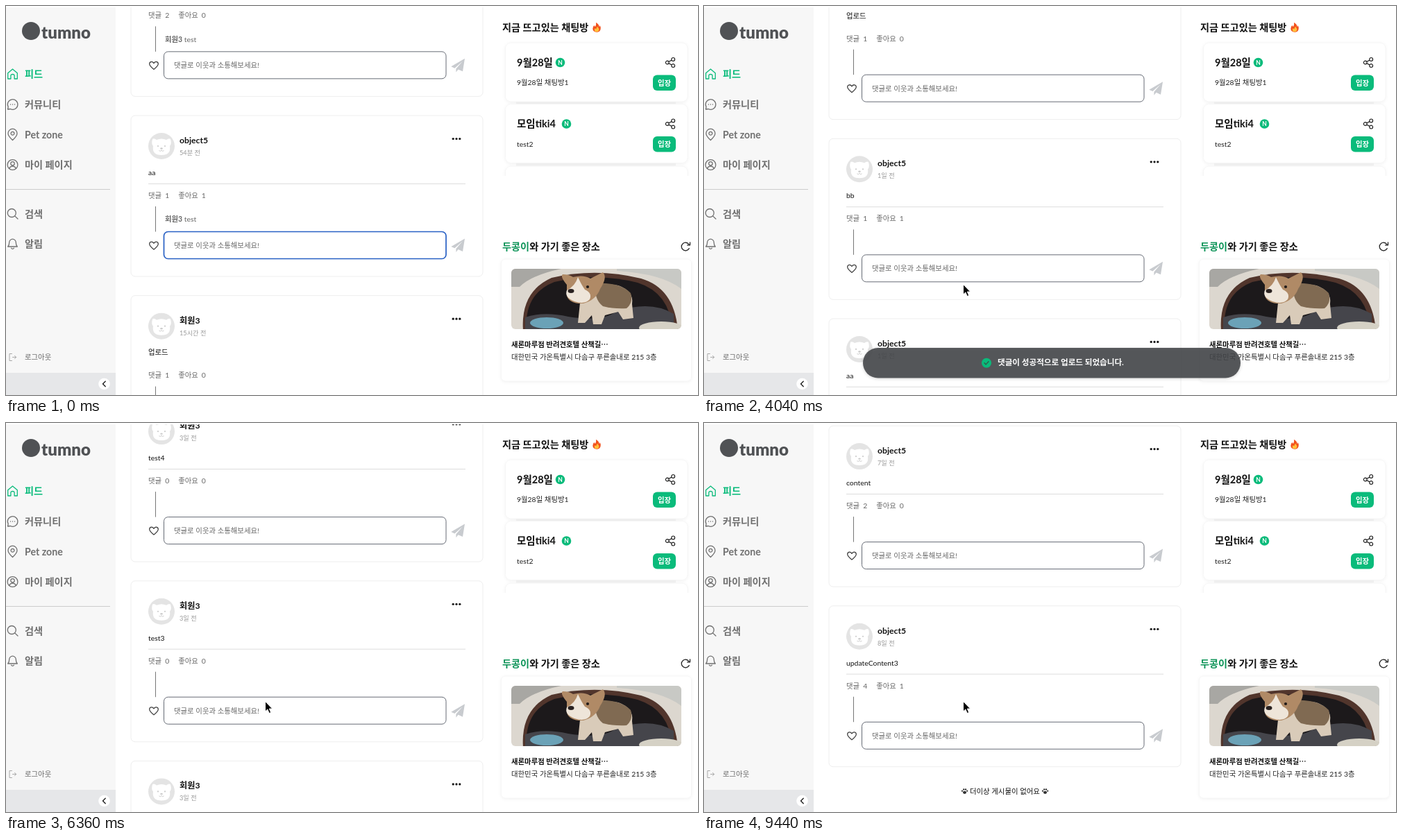
Recreate the animation shown at these times as an HTML page. Size 997 by 561 pixels, loop 9840 ms.

```html
<!DOCTYPE html>
<html lang="ko">
<head>
<meta charset="utf-8">
<style>
html, body { margin: 0; width: 100%; height: 100%; overflow: hidden; background: #fff; }
svg { display: block; font-family: Lato, "Noto Sans CJK KR", "Noto Sans CJK", sans-serif; }
.panel { fill: #fff; stroke: #f6f6f6; filter: drop-shadow(0 1px 2px #0000000d); }
</style>
</head>
<body>
<svg id="stage" width="997" height="561" viewBox="0 0 997 561"></svg>
<script>
const LOOP = 9840, STEP = 40, PITCH = 259.65, GREEN = '#0abb7b';
const stage = document.getElementById('stage');

// y is the vertical middle of the line
const text = (x, y, size, str, fill = '#111', weight = 400, extra = '') =>
  `<text x="${x}" y="${y + size * 0.37}" font-size="${size}" fill="${fill}" font-weight="${weight}" ${extra}>${str}</text>`;
const rect = (x, y, w, h, r, attrs) => `<rect x="${x}" y="${y}" width="${w}" height="${h}" rx="${r}" ${attrs}/>`;
const circle = (x, y, r, fill) => `<circle cx="${x}" cy="${y}" r="${r}" fill="${fill}"/>`;
const oval = (x, y, rx, ry, fill) => `<ellipse cx="${x}" cy="${y}" rx="${rx}" ry="${ry}" fill="${fill}"/>`;
const path = (d, attrs) => `<path d="${d}" ${attrs}/>`;
const at = (x, y, body, scale = 1) => `<g transform="translate(${x} ${y}) scale(${scale})">${body}</g>`;
// line icons are drawn around 0,0 in a box of about 16
const icon = (x, y, d, color, width = 1.3) =>
  at(x, y, path(d, `fill="none" stroke="${color}" stroke-width="${width}" stroke-linecap="round" stroke-linejoin="round"`));
const ring = (x, y, r) => `M${x - r} ${y}a${r} ${r} 0 1 0 ${2 * r} 0a${r} ${r} 0 1 0 ${-2 * r} 0`;

const USER = '회원3', OTHER = 'object5';
const HEART = 'M0 5.5C-3 3-6.3 .7-6.3-2.3C-6.3-5.8-2-6.6 0-3.3C2-6.6 6.3-5.8 6.3-2.3C6.3 .7 3 3 0 5.5Z';
const PLANE = 'M10-10L7 8.5L.5 5.6L-2.6 9.6V4.6L6.8-6.2L-4.6 3.8L-9.7 1.5Z';

// name, time, body, comments, likes, options
const posts = [
  [USER, '50분 전', 'test', 2, 0, { reply: 1 }],
  [OTHER, '54분 전', 'aa', 1, 1, { reply: 1 }],
  [USER, '15시간 전', '업로드', 1, 0, { plain: 1 }],
  [OTHER, '1일 전', 'bb', 1, 1, {}],
  [OTHER, '1일 전', 'aa', 0, 0, {}],
  [OTHER, '1일 전', '{ "content": "aa" }', 0, 0, {}],
  [USER, '3일 전', 'test4', 0, 0, {}],
  [USER, '3일 전', 'test3', 0, 0, {}],
  [USER, '3일 전', 'test', 0, 0, {}],
  [USER, '4일 전', 'test2', 0, 0, {}],
  [USER, '4일 전', 'test', 0, 0, {}],
  [USER, '4일 전', 'test', 0, 0, {}],
  [OTHER, '7일 전', '강아지', 2, 1, { plain: 1, liked: 1 }],
  [USER, '7일 전', 'ㅎㅇ', 3, 1, { liked: 1 }],
  [OTHER, '7일 전', 'content', 2, 0, {}],
  [OTHER, '8일 전', 'updateContent3', 4, 1, {}],
];

const avatar = circle(0, 0, 19, '#e4e4e4') +
  path('M-13-10Q-11-12-7-9Q0-12 7-9Q11-12 13-10Q15-3 12 0Q14 13 0 13Q-14 13-12 0Q-15-3-13-10Z', 'fill="#fff"') +
  circle(-5, 0, 1.1, '#ccc') + circle(5, 0, 1.1, '#ccc') + oval(0, 3.5, 1.8, 1.2, '#ccc') +
  path('M-3.5 6.5Q-1.5 8.5 0 6Q1.5 8.5 3.5 6.5', 'fill="none" stroke="#ccc"');

function post([name, when, body, comments, likes, opt], i) {
  return at(0, i * PITCH,
    rect(180, 0, 507, 232, 6, 'fill="#fff" stroke="#eee"') +
    at(224, 44, avatar) +
    text(250, 35.5, 12.2, name, '#111', 700) +
    text(250, 53.7, 9.2, when, '#999') +
    [-4.8, 0, 4.8].map(dx => circle(649 + dx, 33.5, 1.6, '#111')).join('') +
    text(205, 82, 10.4, body) +
    (opt.plain ? '' : path('M205 98.4H662', 'stroke="#ddd"')) +
    text(205, 115, 10.4, `댓글<tspan dx="5">${comments}</tspan><tspan dx="13">좋아요</tspan><tspan dx="5">${likes}</tspan>`, '#666') +
    path('M215.5 131V167.5', 'stroke="#777"') +
    (opt.reply ? text(229, 149.5, 10.4, `<tspan font-weight="700">${USER}</tspan> test`, '#666') : '') +
    icon(213, 187.5, HEART, opt.liked ? '#e0242f' : '#444') +
    rect(227.5, 167.5, 406.5, 39, 6, `fill="#fff" stroke="#666b75" ${i === 1 ? 'id="field"' : ''}`) +
    text(242, 187, 10.4, '댓글로 이웃과 소통해보세요!', '#666') +
    at(651, 187.5, path(PLANE, 'fill="#c8cbcf"')));
}

const paw = oval(0, 1.8, 2.6, 2.1, '#333') + circle(-3.6, -.3, 1.1, '#333') +
  circle(-1.3, -2.6, 1.2, '#333') + circle(1.5, -2.6, 1.2, '#333') + circle(3.7, -.3, 1.1, '#333');
const feedEnd = at(0, 16 * PITCH + 7.6,
  at(375.5, 0, paw) + text(383, 0, 10.4, '더이상 게시물이 없어요', '#111', 500) + at(491.5, 0, paw));

const menu = [
  [98, '피드', 'M-6.8-1.2L0-7L6.8-1.2V7H2.6V2.5Q2.6 .5 0 .5Q-2.6 .5-2.6 2.5V7H-6.8Z', GREEN],
  [142, '커뮤니티', 'M-7 7L-6.3 3.5A7.3 7.3 0 1 1-3.2 6.5ZM-3 0h.1M0 0h.1M3 0h.1'],
  [185.5, 'Pet zone', 'M0 8Q-6.5 2-6.5-1.8A6.5 6.5 0 0 1 6.5-1.8Q6.5 2 0 8Z' + ring(0, -1.8, 2.4)],
  [229, '마이 페이지', ring(0, 0, 7.4) + ring(0, -1.7, 2.7) + 'M-5 5.3Q-3.5 2.2 0 2.2Q3.5 2.2 5 5.3'],
  [299.5, '검색', ring(-1.2, -1, 6) + 'M3.2 3.4L7.5 7.5'],
  [343, '알림', 'M-6.8 4Q-4.8 2-4.8-2A4.8 4.8 0 0 1 4.8-2Q4.8 2 6.8 4ZM-2 6.2Q0 8.6 2 6.2'],
];
const sidebar = rect(0, 2, 158, 559, 0, 'fill="#f7f7f7"') +
  circle(36, 36, 13, '#505255') + text(51, 38, 24, 'tumno', '#505255', 900) +
  menu.map(([y, label, d, color = '#707070']) =>
    icon(9.5, y, d, color) + text(27, y, 14.2, label, color, 700)).join('') +
  path('M0 264.5H150', 'stroke="#ccc"') +
  icon(9.5, 506.5, 'M-1-5H-4.5V5H-1M0 0H5M3-2.2L5.2 0L3 2.2', '#aaa', 1) +
  text(27, 506.5, 10.4, '로그아웃', '#666') +
  rect(0, 529, 158, 32, 0, 'fill="#e6e7e9"') +
  circle(141.5, 545, 8.3, '#fff') + icon(141.5, 545, 'M1.7-3.8L-2 0L1.7 3.8', '#222', 1.4);

const SHARE = ring(-4.2, 0, 2.4) + ring(4.2, -4.6, 2.4) + ring(4.2, 4.6, 2.4) + 'M-2-1.2L2-3.4M-2 1.2L2 3.4';
const chat = (y, title, badgeX, note) => at(0, y,
  rect(719.5, 0, 262.5, 85, 8, 'class="panel"') +
  path('M735 87H965', 'stroke="#f0f0f0" stroke-width="4"') +
  (title ? text(736, 28.5, 14.5, title, '#111', 700) +
    circle(badgeX, 28.5, 6.8, GREEN) + text(badgeX, 28.6, 8.5, 'N', '#fff', 700, 'text-anchor="middle"') +
    icon(957, 28.5, SHARE, '#222', 1.2) +
    text(736, 57.5, 10.4, note, '#222') +
    rect(932, 46.5, 33, 22.5, 6, `fill="${GREEN}"`) +
    text(948.5, 57.7, 10.4, '입장', '#fff', 700, 'text-anchor="middle"') : ''));

const flame = path('M-1-8Q4-5 4-1Q5.5-2 5.3-3.5Q7 0 6.2 3Q5 7.5 0 7.5Q-6 7.3-6.3 2Q-6.3-1-3.8-3.5Q-3.5-1.8-2.4-1Q-.3-4-1-8Z', 'fill="#f2511d"') +
  path('M.5-2Q4 1 3.8 3.7Q3.2 7-.2 7Q-3.6 6.7-3.6 3.5Q-3.4 2-2.4 1.2Q-2 2.4-1 2.4Q.8 .8 .5-2Z', 'fill="#ffc03b"');

const photo = '<clipPath id="photo">' + rect(728, 379, 245, 87, 6, '') + '</clipPath><g clip-path="url(#photo)">' +
  rect(728, 379, 245, 87, 0, 'fill="#dcd7cf"') +
  path('M728 379H800Q757 388 740 405H728Z', 'fill="#a8a7a3"') +
  path('M880 379H973V408Q945 386 880 382Z', 'fill="#c8c9c5"') +
  path('M745 468Q741 412 786 392Q850 377 915 393Q963 407 968 468Z', 'fill="#51352c"') +
  path('M750 468Q746 415 790 398Q850 384 910 399Q957 414 960 468Z', 'fill="#1c191b"') +
  path('M748 449Q775 440 810 448Q860 456 880 440Q930 424 962 444V468H748Z', 'fill="#45454b"') +
  oval(779, 457, 24, 8, '#6ba2b7') +
  path('M836 408Q852 397 882 403Q905 411 902 430L904 450L889 452L882 441L863 446L858 459H846L844 446L834 457H824L827 428Z', 'fill="#d9cbb9"') +
  path('M850 400Q884 398 900 414Q904 428 894 436Q876 437 860 433Q846 422 850 400Z', 'fill="#806a52"') +
  path('M808 402Q798 390 802 387Q811 387 817 391Q832 387 842 393L860 384Q867 391 856 408Q850 424 832 429Q812 430 808 418Z', 'fill="#b08a66"') +
  path('M824 391Q829 402 834 409Q845 414 841 423Q834 431 819 426Q804 420 808 410Q820 404 824 391Z', 'fill="#eee5d9"') +
  oval(814, 411, 4.5, 3, '#29211f') + circle(838, 405, 2.1, '#211b19') +
  oval(944, 464, 32, 9, '#d5d1c5') + '</g>';

const aside = text(715, 31, 14.2, '지금 뜨고있는 채팅방', '#111', 700) + at(851, 31, flame, .9) +
  '<clipPath id="chats"><rect x="712" y="45" width="285" height="200"/></clipPath><g clip-path="url(#chats)">' +
  chat(53, '9월28일', 798.5, '9월28일 채팅방1') + chat(141.5, '모임tiki4', 807.5, 'test2') + chat(231, '') + '</g>' +
  text(715, 347, 14.2, '<tspan fill="#0d9458">두콩이</tspan>와 가기 좋은 장소', '#111', 700) +
  icon(979, 347, 'M5.2 2.6A5.8 5.8 0 1 1 5-3M6.5-6V-2.2H2.6', '#222') +
  rect(713.5, 365, 274, 176, 6, 'class="panel"') + photo +
  text(728, 488, 10.4, '새론마루점 반려견호텔 산책길⋯', '#111', 700) +
  text(728, 506.5, 10.4, '대한민국 가온특별시 다솜구 푸른솔내로 215 3층', '#222');

const toast = '<g id="toast">' +
  rect(229, 493, 544, 43.5, 21.7, 'fill="#424548" fill-opacity=".88" style="filter:drop-shadow(0 1px 2px #0003)"') +
  circle(407, 514.7, 7, GREEN) + icon(407, 514.7, 'M-3 0L-.8 2.2L3-2', '#315d4b', 1.4) +
  text(423, 514, 11.6, '댓글이 성공적으로 업로드 되었습니다.', '#fff', 700) + '</g>';

const cursor = '<g id="cursor">' + at(373.5, 401.5,
  path('M0 0V14.5L3.3 11.4L5.7 17L8.2 16L5.8 10.6H10.2Z', 'fill="#000" stroke="#fff" stroke-width="1"')) + '</g>';

stage.innerHTML =
  '<clipPath id="page"><rect y="2" width="997" height="559"/></clipPath>' +
  `<g clip-path="url(#page)"><g id="feed">${posts.map(post).join('')}${feedEnd}</g></g>` +
  sidebar + aside + toast + cursor;

const [feed, field, toastEl, cursorEl] = ['feed', 'field', 'toast', 'cursor'].map(id => document.getElementById(id));

const clamp = v => Math.min(1, Math.max(0, v));
const easeOut = p => 1 - (1 - p) ** 3;
// flicks of the wheel: start, end, scroll reached
const flicks = [
  [3360, 4320, 600], [4400, 5360, 891.8], [5400, 5640, 1180],
  [5880, 6440, 1591], [7120, 8080, 2370.7], [8120, 8360, 2772.3], [8520, 9440, 3631],
];

function scrollAt(t) {
  let pos = 101.65;
  for (const [from, to, goal] of flicks) pos += (goal - pos) * easeOut(clamp((t - from) / (to - from)));
  return pos;
}

function draw() {
  // the picture advances at 25 steps a second
  const t = Math.floor(performance.now() % LOOP / STEP) * STEP;
  feed.setAttribute('transform', `translate(0 ${-scrollAt(t)})`);
  const focused = t < 2360;
  field.setAttribute('stroke', focused ? '#2860c4' : '#666b75');
  field.setAttribute('stroke-width', focused ? 1.7 : 1);
  cursorEl.setAttribute('opacity', focused ? 0 : 1);
  const shown = easeOut(clamp((t - 2400) / 240)) * (1 - clamp((t - 5400) / 240));
  toastEl.setAttribute('opacity', shown);
  toastEl.setAttribute('transform', `translate(0 ${16 * (1 - shown)})`);
  requestAnimationFrame(draw);
}
draw();
</script>
</body>
</html>
```
